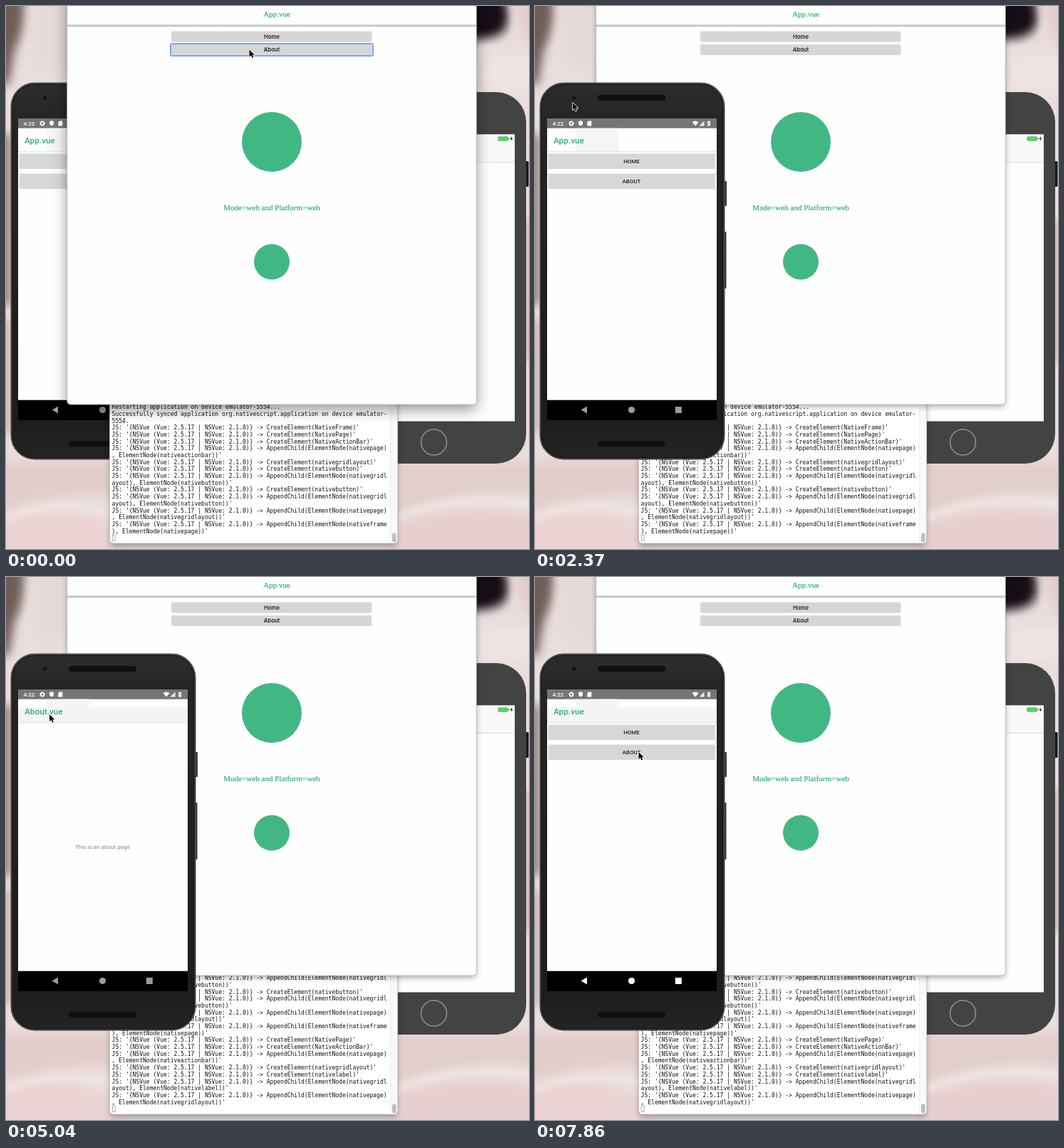
Recreate the animation shown at these times as an HTML page. Size 734x763 px, loop 8 s.

```html
<!DOCTYPE html>
<html lang="en">
<head>
<meta charset="utf-8">
<title>App.vue</title>
<style>
  html, body { margin: 0; width: 100%; height: 100%; overflow: hidden; background: #e9dddc; }
  svg { display: block; width: 100%; height: 100%; }
  text { white-space: pre; }
  .web { font: 11.1px "Liberation Serif", serif; fill: #2bb073; stroke: #2bb073; stroke-width: .2; text-anchor: middle; }
  .btn { font: 600 7.7px Inter, sans-serif; fill: #222; text-anchor: middle; }
  .droid { font-family: Roboto, sans-serif; }
  .cap { font-size: 8px; font-weight: 500; fill: #222; text-anchor: middle; }
  .log { font: 8.03px "DejaVu Sans Mono", monospace; fill: #111; }
</style>
</head>
<body>
<svg id="stage" viewBox="0 0 734 763" xmlns="http://www.w3.org/2000/svg">
  <defs>
    <filter id="soft" x="-50%" y="-50%" width="200%" height="200%"><feGaussianBlur stdDeviation="7"/></filter>
    <filter id="wide" x="-20%" y="-20%" width="140%" height="140%"><feGaussianBlur stdDeviation="10"/></filter>
    <filter id="tight" x="-20%" y="-20%" width="140%" height="140%"><feGaussianBlur stdDeviation="4"/></filter>
    <linearGradient id="body" x2="0" y2="1">
      <stop offset="0" stop-color="#2d2d2d"/><stop offset=".1" stop-color="#252525"/>
      <stop offset=".9" stop-color="#1d1d1d"/><stop offset="1" stop-color="#242424"/>
    </linearGradient>
    <linearGradient id="rule" x2="0" y2="1">
      <stop offset="0" stop-color="#aaa"/><stop offset="1" stop-color="#fff"/>
    </linearGradient>
    <clipPath id="navClip"><rect x="17" y="554" width="238" height="28"/></clipPath>
  </defs>

  <!-- blurred wallpaper -->
  <rect width="734" height="763" fill="#e9dedd"/>
  <g filter="url(#soft)">
    <path d="M-20-20H24Q30 30 12 62L4 110H-20Z" fill="#6f5d59"/>
    <path d="M40-10H90V90H50Q30 50 40-10Z" fill="#e4dad7"/>
    <path d="M640-20H694Q712 10 700 34Q684 50 640 46Z" fill="#171112"/>
    <path d="M716-10H750V70Q720 50 716-10Z" fill="#e3cbc8"/>
    <path d="M670 70H740V118H670Z" fill="#efe4e1"/>
    <path d="M-20 180H6V420H-20Z" fill="#8d7772"/>
    <path d="M-20 440H6V600H-20Z" fill="#c9adaa"/>
    <path d="M728 300H760V500H728Z" fill="#d5b3ab"/>
    <path d="M-20 640H160V690Q70 680-20 715Z" fill="#e3cdca"/>
    <path d="M-20 725Q60 690 160 735V780H-20Z" fill="#ebd3d3"/>
    <path d="M540 640H760V690Q640 670 540 720Z" fill="#e2cfcb"/>
    <path d="M540 730Q640 690 760 720V780H540Z" fill="#e8cfcf"/>
  </g>
  <g fill="none" stroke="#f8eeec" stroke-width="6" opacity=".7" filter="url(#tight)">
    <path d="M-5 722Q70 690 150 712"/>
    <path d="M540 722Q630 682 740 700"/>
  </g>

  <!-- right phone -->
  <rect x="729" y="218" width="4.5" height="36" rx="1.5" fill="#171717"/>
  <rect x="460" y="121" width="270" height="522" rx="42" fill="#434343"/>
  <rect x="476" y="180.500" width="238" height="403" fill="#fefefe"/>
  <rect x="476" y="180.500" width="238" height="38.500" fill="#f8f8f8"/>
  <path d="M476 219.500H714" stroke="#dcdcdc"/>
  <rect x="690.500" y="183.500" width="14" height="6" rx="1.200" fill="#4cd75f" stroke="#8fae91" stroke-width=".6"/>
  <path d="M705.600 185.300v2.500" stroke="#777" stroke-width="1.100"/>
  <path d="M710 183l-2.700 4h2l-.8 3 2.900-4.200h-2z" fill="#222"/>
  <circle cx="600.500" cy="613" r="18" fill="none" stroke="#8d8d8d" stroke-width="1.600"/>

  <g id="terminal">
    <rect x="146" y="400" width="403" height="360" rx="6" fill="#000" opacity=".3" filter="url(#tight)"/>
    <rect x="145.500" y="400" width="404" height="355" rx="5" fill="#fff" stroke="#b9b9b9" stroke-width=".8"/>
    <path d="M540 540H549.200V750.500Q549 754.500 545 754.500H540Z" fill="#f9f9f9"/>
    <path d="M539.700 540V754.500" stroke="#e5e5e5" stroke-width=".8"/>
    <rect x="542" y="740.500" width="5.500" height="13" rx="2.700" fill="#bebebe"/>
    <rect x="149.300" y="743" width="3.800" height="8.500" fill="none" stroke="#999" stroke-width=".8"/>
    <g id="log" class="log"></g>
  </g>

  <g id="browser">
    <rect id="shadeOn" x="86" y="-60" width="574" height="627" rx="6" opacity=".42" filter="url(#wide)"/>
    <rect id="shadeOff" x="86" y="-60" width="574" height="623" rx="6" opacity=".32" filter="url(#tight)"/>
    <rect x="85.700" y="-20" width="574.600" height="580" rx="5" fill="#fefefe" stroke="#aaa" stroke-width=".7"/>
    <rect x="86" y="26.500" width="574" height="4" fill="url(#rule)"/>
    <text class="web" x="380" y="15">App.vue</text>
    <g fill="#d6d6d6">
      <rect x="232" y="35.500" width="281.500" height="15" rx="2.500"/>
      <rect x="232" y="54" width="281.500" height="15" rx="2.500"/>
    </g>
    <rect id="ring" x="231" y="0" width="284" height="17" rx="2" fill="none" stroke="#7ea2f3" stroke-width="2"/>
    <text class="btn" x="373" y="45.800">Home</text>
    <text class="btn" x="373" y="64.300">About</text>
    <g id="webHome">
      <circle cx="373" cy="191" r="42" fill="#41b883"/>
      <text class="web" x="373" y="287">Mode=web and Platform=web</text>
      <circle cx="373" cy="359.500" r="25" fill="#41b883"/>
    </g>
    <text id="webAbout" class="web" x="373" y="158">This is an about page</text>
  </g>

  <g id="phone" class="droid">
    <g fill="#3c3c3c">
      <rect x="264" y="246" width="5" height="35" rx="1"/>
      <rect x="264" y="317" width="4.500" height="80" rx="1"/>
    </g>
    <rect x="7.500" y="108.500" width="258" height="528" rx="33" fill="url(#body)" stroke="#454545" stroke-width="2"/>
    <rect x="9.500" y="110.500" width="254" height="524" rx="31" fill="none" stroke="#151515"/>
    <g fill="#0f0f0f" stroke="#191919" stroke-width=".6">
      <rect x="88" y="125" width="95" height="8" rx="4"/>
      <rect x="88" y="611" width="95" height="8" rx="4"/>
      <circle cx="54.500" cy="129" r="2.500"/>
    </g>
    <rect x="17" y="158" width="238" height="424" fill="#fefefe"/>
    <rect x="17" y="158" width="238" height="13.700" fill="#757575"/>
    <text x="24.500" y="168" font-size="8" font-weight="500" fill="#fff">4:22</text>
    <g fill="#fff">
      <circle cx="51" cy="165" r="2.300" fill="none" stroke="#fff" stroke-width="1.600"/>
      <circle cx="51" cy="165" r="3.400" fill="none" stroke="#fff" stroke-width="1" stroke-dasharray="1.300 1.370"/>
      <path d="M64 161l3 1.200v2.300q0 2.800-3 4-3-1.200-3-4v-2.300z"/>
      <path d="M75 161.500h4.300v7h-6v-5.300z"/>
      <path d="M220.500 163.200q4.500-3.400 9 0l-4.500 5.300z"/>
      <path d="M237.500 161.300v7.200h-7z" opacity=".85"/>
      <path d="M242.200 162.300h1v-.9h1.800v.9h1v6.200h-3.800z"/>
    </g>
    <path d="M244.200 163.500v2.500m0 .7v1" stroke="#757575" stroke-width=".9"/>
    <rect x="57" y="171.700" width="60" height="32.800" fill="#f5f5f5"/>
    <rect id="bar" x="17" y="183" width="238" height="21.500" fill="#f4f4f4"/>
    <path d="M17 204.800H255" stroke="#dedede"/>
    <text id="title" x="26" y="192.500" font-size="11.800" font-weight="500" fill="#2bb073">App.vue</text>
    <g id="appHome">
      <rect x="18.500" y="207.500" width="234.500" height="21.500" rx="1.500" fill="#d6d7d7"/>
      <rect x="18.500" y="235.500" width="234.500" height="21.500" rx="1.500" fill="#d6d7d7"/>
      <text class="cap" x="135.500" y="221">HOME</text>
      <text class="cap" x="135.500" y="249">ABOUT</text>
    </g>
    <text id="appAbout" x="135.500" y="382" font-size="8.100" fill="#858585" text-anchor="middle">This is an about page</text>
    <rect x="17" y="553.700" width="238" height="28.300"/>
    <circle id="ripple" cx="69" cy="567.500" r="19" fill="#fff" opacity=".18" clip-path="url(#navClip)"/>
    <g id="nav">
      <path d="M64.500 567.500L73 562.500V572.500Z"/>
      <circle cx="135.500" cy="567.500" r="4.600"/>
      <rect x="196.800" y="563" width="9" height="9"/>
    </g>
  </g>

  <path id="cursor" d="M0 0V10L2.400 7.800 4 11.500 5.700 10.800 4.100 7.200H7.300Z" stroke="#fff" stroke-width="1.500" stroke-linejoin="round" paint-order="stroke"/>
</svg>
<script>
const LOOP = 8000;
const $ = id => document.getElementById(id);
const show = (id, on) => $(id).setAttribute('display', on ? 'inline' : 'none');

// Bursts of screen updates: start, end, number of updates
const bursts = [
  [150, 1030, 7], [1770, 2810, 8], [2960, 3700, 6],
  [4590, 5040, 4], [6080, 7110, 8], [7260, 7860, 5]
];

// Pointer path: time, x, y
const path = [
  [0, 341.5, 61.5], [297, 341.5, 61.5], [737, 341, 44], [1620, 341, 44],
  [2216, 55, 131], [2364, 53, 136], [2513, 53, 136], [2810, 98, 206],
  [3256, 132.5, 250.5], [3404, 132.5, 250.5], [3700, 131.5, 226],
  [4440, 131.5, 226], [5040, 61, 193], [5932, 61, 193], [6668, 63, 558],
  [6815, 66, 563], [7110, 66, 563], [7710, 145.5, 246], [LOOP, 145.5, 246]
];

function snap(t) {
  let held = 0;
  for (const [start, end, count] of bursts) {
    if (t < start) break;
    const step = (end - start) / (count - 1);
    held = start + step * Math.min(count - 1, Math.floor((t - start + 10) / step));
  }
  return held;
}

function pointer(t) {
  const i = path.findIndex(p => p[0] > t);
  const [t0, x0, y0] = path[i - 1], [t1, x1, y1] = path[i];
  const u = (t - t0) / (t1 - t0), k = u * u * (3 - 2 * u);
  return [x0 + (x1 - x0) * k, y0 + (y1 - y0) * k];
}

const js = call => `JS: '{NSVue (Vue: 2.5.17 | NSVue: 2.1.0)} -> ${call}'`;
const create = name => js(`CreateElement(${name})`);
const append = (a, b) => js(`AppendChild(ElementNode(${a}), ElementNode(${b}))`);
const wrap = lines => lines.flatMap(s => s.match(/.{1,80}/g));

const firstLog = wrap([
  'Restarting application on device emulator-5554...',
  'Successfully synced application org.nativescript.application on device emulator-5554.',
  create('NativeFrame'), create('NativePage'), create('NativeActionBar'),
  append('nativepage', 'nativeactionbar'),
  create('nativegridlayout'),
  create('nativebutton'), append('nativegridlayout', 'nativebutton'),
  create('nativebutton'), append('nativegridlayout', 'nativebutton'),
  append('nativepage', 'nativegridlayout'),
  append('nativeframe', 'nativepage')
]);
const fullLog = firstLog.concat(wrap([
  create('NativePage'), create('NativeActionBar'),
  append('nativepage', 'nativeactionbar'),
  create('nativegridlayout'),
  create('nativelabel'), append('nativegridlayout', 'nativelabel'),
  append('nativepage', 'nativegridlayout')
]));

const ROWS = 19;
const rows = Array.from({ length: ROWS }, (_, i) => {
  const row = document.createElementNS('http://www.w3.org/2000/svg', 'text');
  row.setAttribute('x', 148.6);
  row.setAttribute('y', 566.3 + i * 9.68);
  return $('log').appendChild(row);
});

let shownLog, wasFront;

function draw(time) {
  const t = snap(time % LOOP);

  const front = t > 2350;
  if (front !== wasFront) {
    $('stage').insertBefore($('phone'), front ? $('cursor') : $('terminal'));
    wasFront = front;
  }
  show('shadeOn', !front);
  show('shadeOff', front);

  const webAbout = t >= 150 && t < 870;
  show('webAbout', webAbout);
  show('webHome', !webAbout);
  show('ring', !front);
  $('ring').setAttribute('y', t < 870 ? 53 : 34.5);

  const about = t > 3540 && t < 7250;
  show('appAbout', about);
  show('appHome', !about);
  show('bar', t > 3540);
  $('title').textContent = about ? 'About.vue' : 'App.vue';
  show('ripple', t > 6950 && t < 7250);
  $('nav').setAttribute('fill', t > 7250 ? '#fff' : '#9b9b9b');

  const log = t > 3540 ? fullLog : firstLog;
  if (log !== shownLog) {
    log.slice(-ROWS).forEach((s, i) => rows[i].textContent = s);
    shownLog = log;
  }

  $('cursor').setAttribute('transform', `translate(${pointer(t)})`);
}

const start = performance.now();
function tick() {
  draw(performance.now() - start);
  requestAnimationFrame(tick);
}
tick();
</script>
</body>
</html>
```
